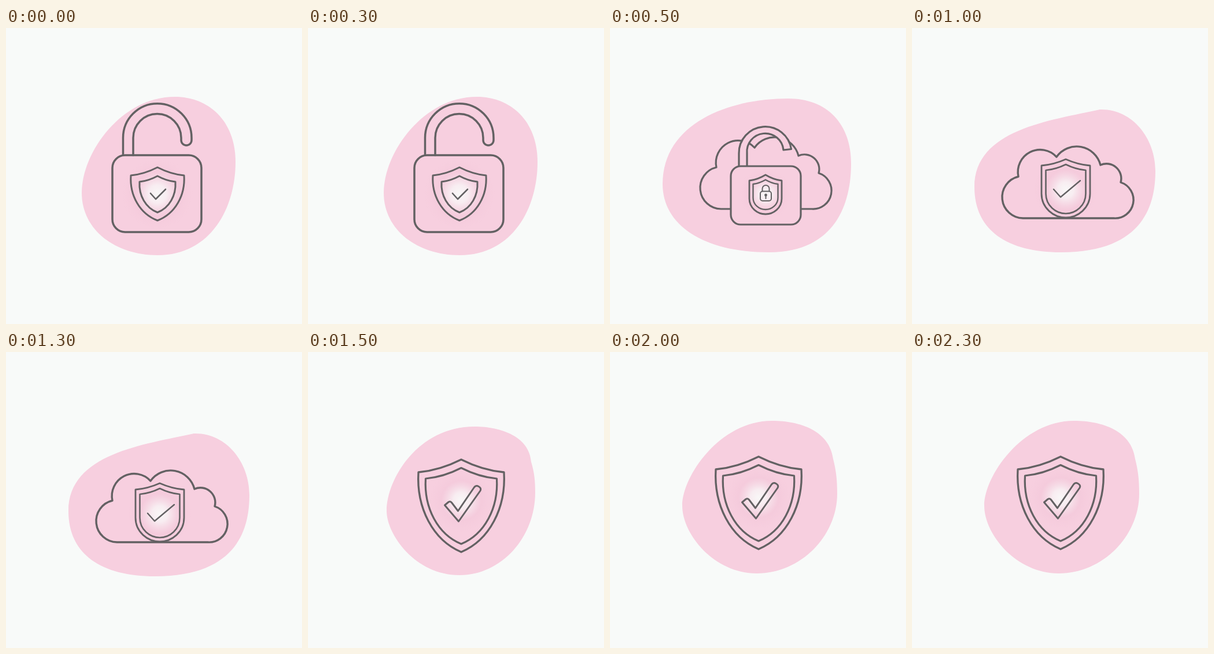
Animation, 512 px wide and 512 px high, one loop 2500 ms. Source, as an HTML page with a canvas:

```html
<!DOCTYPE html>
<html lang="en">
<head>
<meta charset="utf-8">
<title>Cloud security</title>
<style>
  html, body { margin: 0; width: 100%; height: 100%; overflow: hidden; background: #f8faf9; }
  canvas { display: block; width: 512px; height: 512px; }
</style>
</head>
<body>
<canvas id="stage" width="512" height="512"></canvas>
<script>
const ctx = document.getElementById('stage').getContext('2d');
const PAPER = '#f8faf9', PINK = '#f7cfdf', INK = '#636163';
const HOLD = 500;

const CLOUD = new Path2D('M192 329A36.5 36.5 0 0 1 184 257A38.5 38.5 0 0 1 250 223' +
  'A42.5 42.5 0 0 1 326 237A25.5 25.5 0 0 1 361 267A31.8 31.8 0 0 1 349 329Z');
const BOLD_CHECK = new Path2D('M236.5 265L243 259.5Q246 257.5 248.5 260.5L259.5 275L287.5 234' +
  'Q290.5 230 295 232.5Q300.5 235.5 298 240L260.5 293Z');

function line(path, width = 3.2) {
  ctx.lineWidth = width;
  ctx.stroke(path);
}

function blob(d) {
  ctx.fillStyle = PINK;
  ctx.fill(new Path2D(d));
}

function glow(x, y, r) {
  const g = ctx.createRadialGradient(x, y, 0, x, y, r);
  g.addColorStop(0, 'rgba(249,247,247,1)');
  g.addColorStop(0.25, 'rgba(248,240,243,.9)');
  g.addColorStop(0.62, 'rgba(243,200,218,.6)');
  g.addColorStop(1, 'rgba(245,203,220,0)');
  ctx.fillStyle = g;
  ctx.fillRect(x - r, y - r, 2 * r, 2 * r);
}

// The sides run straight down for the given share, then curve to the tip.
const POINTED = { straight: 0, a: 1.05, b: 0.45, c: 0.66, d: 0.15 };
const ROUND = { straight: 0.54, a: 1, b: 0.6, c: 0.5, d: 0 };

function shield(x, top, half, shoulder, bottom, shape, width) {
  const start = shoulder + (bottom - shoulder) * shape.straight;
  const h = bottom - start;
  const dip = top + (shoulder - top) * 0.85;
  const y1 = start + h * shape.b, y2 = bottom - h * shape.d;
  const p = new Path2D();
  p.moveTo(x, top);
  p.quadraticCurveTo(x - half * 0.5, dip, x - half, shoulder);
  p.lineTo(x - half, start);
  p.bezierCurveTo(x - half * shape.a, y1, x - half * shape.c, y2, x, bottom);
  p.bezierCurveTo(x + half * shape.c, y2, x + half * shape.a, y1, x + half, start);
  p.lineTo(x + half, shoulder);
  p.quadraticCurveTo(x + half * 0.5, dip, x, top);
  p.closePath();
  line(p, width);
}

function box(x, y, w, h, r, width, fill) {
  const p = new Path2D();
  p.roundRect(x, y, w, h, r);
  if (fill) {
    ctx.fillStyle = PINK;
    ctx.fill(p);
  }
  line(p, width);
}

function openLock() {
  blob('M292 119C350 119 397 160 397 232C397 310 355 393 262 393' +
    'C190 393 131 350 131 285C131 215 200 119 292 119Z');
  line(new Path2D('M202.5 220V190A59.2 59.2 0 0 1 321 190V194A9 9 0 0 1 303 194V190' +
    'A41.5 41.5 0 0 0 220 190V220'), 3.5);
  box(184, 220, 154, 133, 22, 3.5);
  glow(262, 287, 62);
  shield(262, 241, 46, 255, 333, POINTED, 3);
  shield(262, 256, 31, 266, 319, POINTED, 3);
  line(new Path2D('M250 286L259 296L276 279'), 2.6);
}

function lockedCloud() {
  blob('M308 122C375 122 417 165 417 235C417 300 392 388 275 388' +
    'C160 388 91 340 91 270C91 165 205 122 308 122Z');
  ctx.save();
  ctx.translate(0, -16);
  line(CLOUD);
  ctx.restore();
  const shackle = new Path2D('M223 239V217A45.5 45.5 0 0 1 313.5 209.5L300 211' +
    'A31.5 31.5 0 0 0 237 217V239');
  ctx.fillStyle = PINK;
  ctx.fill(shackle);
  line(shackle);
  box(209, 239, 121, 101, 17, 3.2, true);
  glow(269, 287, 46);
  shield(269, 254, 28, 264, 322, ROUND, 2.8);
  shield(269, 262.5, 21.5, 270, 314, ROUND, 2.4);
  box(260, 282.5, 19, 16.5, 4, 2);
  line(new Path2D('M263.5 282V278A6 6 0 0 1 275.5 278V282'), 2);
  line(new Path2D('M269.5 288V295'), 2);
  ctx.fillStyle = INK;
  ctx.beginPath();
  ctx.arc(269.5, 289, 2.4, 0, 7);
  ctx.fill();
}

function shieldedCloud() {
  blob('M325 141C380 139 421 190 421 247C421 300 405 388 258 388' +
    'C165 388 108 350 108 275C108 175 240 160 325 141Z');
  glow(266, 280, 56);
  line(CLOUD, 3.4);
  shield(266, 227, 42, 238, 328, ROUND, 2.8);
  shield(266, 236, 34.5, 246, 321, ROUND, 2.6);
  line(new Path2D('M245 279L257 292.5L291 264'), 2.4);
}

function bigShield() {
  glow(265, 257, 56);
  shield(265, 186, 74, 208, 346, POINTED, 3.3);
  shield(265, 200.5, 61.5, 219, 332, POINTED, 3.2);
  line(BOLD_CHECK, 3);
}

function lowShield() {
  blob('M288 129C335 129 383 147 386 190C392 210 393 225 393 243C393 320 335 386 262 386' +
    'C185 386 136 315 136 275C136 220 190 129 288 129Z');
  bigShield();
}

function highShield() {
  blob('M280 119C330 119 380 137 386 185C391 205 393 220 393 245C393 318 330 383 254 383' +
    'C180 383 125 315 125 266C125 215 190 119 280 119Z');
  ctx.save();
  ctx.translate(-8, -5);
  bigShield();
  ctx.restore();
}

const scenes = [openLock, lockedCloud, shieldedCloud, lowShield, highShield];
const begin = performance.now();

function draw() {
  const time = Math.max(0, performance.now() - begin);
  ctx.fillStyle = PAPER;
  ctx.fillRect(0, 0, 512, 512);
  ctx.strokeStyle = INK;
  ctx.lineJoin = 'round';
  ctx.lineCap = 'round';
  scenes[Math.floor(time / HOLD) % scenes.length]();
  requestAnimationFrame(draw);
}
draw();
</script>
</body>
</html>
```
